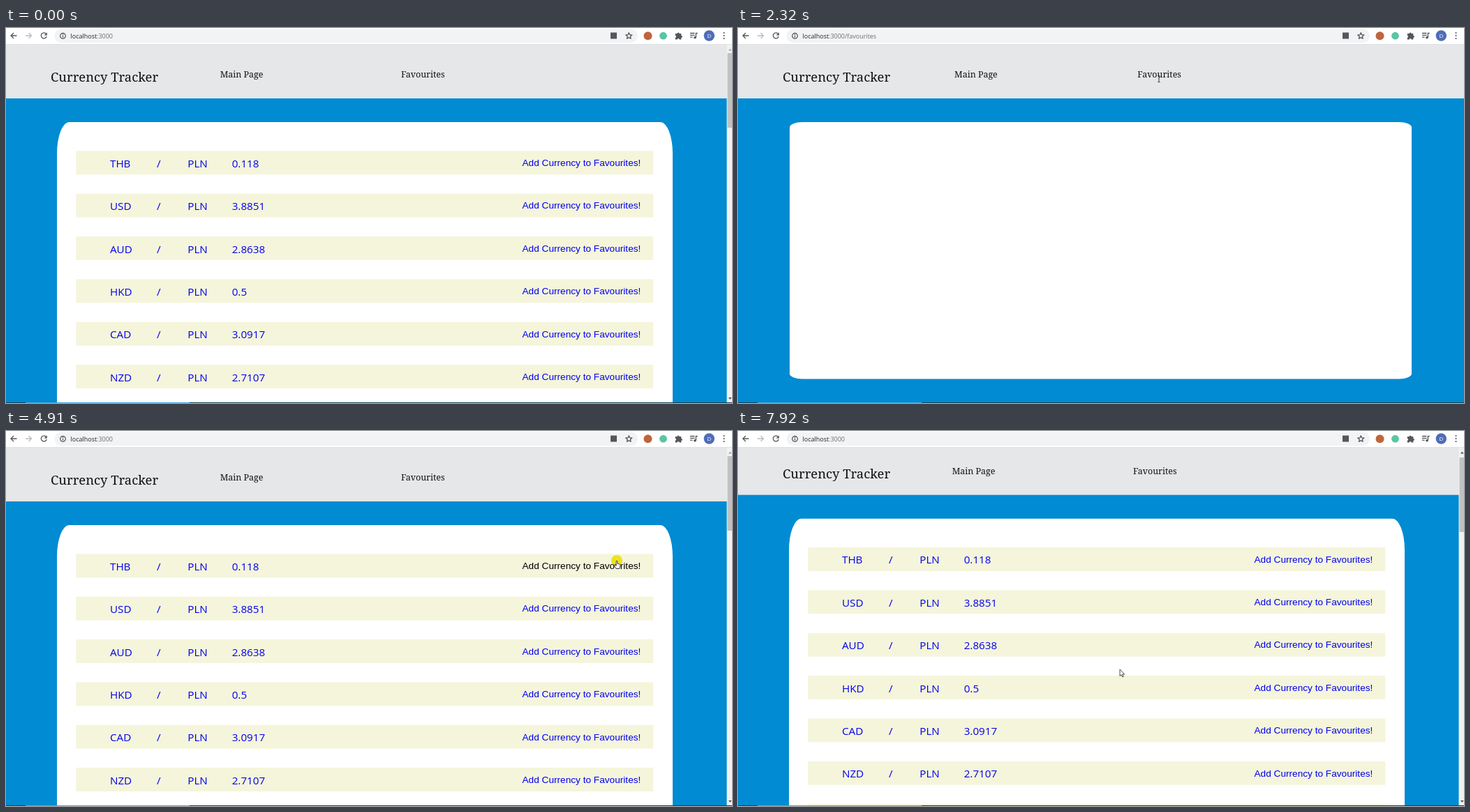
Recreate the animation shown at these times as an HTML page. Size 1040 by 538 pixels, loop 7990 ms.

```html
<!DOCTYPE html>
<html lang="en">
<head>
<meta charset="utf-8">
<title>Currency Tracker</title>
<style>
  html, body { margin: 0; width: 100%; height: 100%; overflow: hidden; background: #fff; }
  svg { display: block; }
  .serif { font-family: "Noto Serif", serif; fill: #111; }
  .title { font-size: 18.4px; }
  .nav { font-size: 12.45px; }
  .rate { font: 15.2px "Open Sans", sans-serif; fill: #0000f0; }
  .add { font: 13.65px "Liberation Sans", Arial, sans-serif; fill: #0000f0; }
  .add.active { fill: #000; }
  .url { font: 8.97px "Open Sans", sans-serif; fill: #222529; }
  .dim { fill: #6b7075; }
  .line { fill: none; stroke: #53575c; stroke-width: 1.3; }
  .solid { fill: #53575c; }
  .halo { fill: #f7ec28; mix-blend-mode: multiply; }
</style>
</head>
<body>
<svg width="1040" height="538" viewBox="0 0 1040 538">
  <rect width="1040" height="538" fill="#008bd2"/>

  <g id="page">
    <rect y="10" width="1040" height="91" fill="#e5e7e9"/>
    <text class="serif title" x="64" y="77">Currency Tracker</text>
    <text class="serif nav" id="navMain" y="71">Main Page</text>
    <text class="serif nav" id="navFav" y="71">Favourites</text>
    <g id="list">
      <rect x="73" y="135" width="882" height="2250" rx="17.6" ry="45" fill="#fff"/>
    </g>
    <rect id="empty" x="74" y="135" width="891" height="368.5" rx="17.8" ry="7.4" fill="#fff"/>
  </g>

  <g id="scrollbar">
    <rect x="1032.5" y="24" width="7.5" height="514" fill="#f1f1f1"/>
    <rect id="thumb" x="1033.5" y="36" width="6.5" height="107" fill="#c1c1c1"/>
    <path id="up" d="M1035 32.5l2.3-3 2.3 3z"/>
    <path d="M1035 530l2.3 3 2.3-3z" fill="#505050"/>
  </g>

  <g id="toolbar">
    <rect width="1040" height="23.5" fill="#fff"/>
    <rect y="23" width="1040" height="1" fill="#dfe1e4"/>
    <rect x="69.5" y="1.5" width="835.5" height="19.5" rx="9.75" fill="#f1f3f4"/>
    <path class="line" d="M15.5 11H7M11 7l-4 4 4 4"/>
    <path class="line" style="stroke:#babcbe" d="M28 11h8.5M32.5 7l4 4-4 4"/>
    <path class="line" d="M57.6 8.6A4 4 0 1 0 58.2 12"/>
    <path class="solid" d="M58.8 6.2v4.2h-4.2z"/>
    <circle class="line" cx="81.5" cy="11.3" r="3.8" stroke-width="1"/>
    <path class="line" d="M81.5 10.8v2.6M81.5 8.8v1.1"/>
    <text class="url" x="92.5" y="14.6">localhost<tspan class="dim">:3000<tspan id="path"></tspan></tspan></text>
    <rect class="solid" x="866" y="6.5" width="9" height="9"/>
    <path class="line" stroke-linejoin="round" d="M892.3 6.8l1.3 2.9 3.2.3-2.4 2.1.7 3.1-2.8-1.6-2.8 1.6.7-3.1-2.4-2.1 3.2-.3z"/>
    <circle cx="919.5" cy="11.2" r="6" fill="#c0643c"/>
    <circle cx="941.5" cy="11.2" r="5.4" fill="#58c6a2"/>
    <path class="solid" d="M958.8 8h2.7a1.6 1.6 0 0 1 3.2 0h2.6v2.7a1.6 1.6 0 0 1 0 3.2v2.6h-2.6a1.6 1.6 0 0 0-3.2 0h-2.7v-2.7a1.6 1.6 0 0 0 0-3.1z"/>
    <path class="line" d="M980 7.5h6.5M980 10.3h6.5M980 13.1h3.6M988.4 13.5V7.5h2.3"/>
    <circle class="solid" cx="987" cy="13.7" r="1.8"/>
    <circle cx="1007.3" cy="11" r="7.7" fill="#4f6cb8"/>
    <text x="1007.3" y="14" text-anchor="middle" font-family="Open Sans, sans-serif" font-size="8" fill="#fff">D</text>
    <g class="solid">
      <circle cx="1028.5" cy="7" r="1.1"/><circle cx="1028.5" cy="11" r="1.1"/><circle cx="1028.5" cy="15" r="1.1"/>
    </g>
  </g>

  <rect y="537" width="1040" height="1" fill="#12405a"/>
  <rect x="28" y="537" width="235" height="1" fill="#45a9de"/>

  <g id="cursor">
    <circle class="halo" id="halo" r="8"/>
    <path id="arrow" d="M0 0v9.6l2.2-2 1.5 3.3 1.5-.7-1.5-3.2h3z" fill="#fff" stroke="#222" stroke-width=".8"/>
    <path id="beam" d="M-1.6-4.5h1.2l.4.4.4-.4h1.2M0-4.2v8.4M-1.6 4.5h1.2l.4-.4.4.4h1.2" fill="none" stroke="#222" stroke-width=".9"/>
    <path id="hand" d="M-.9.8q.9-1.5 1.8 0v3.6l3 .6q1.2.4 1 1.7l-.7 3.2-.8 1.6h-4L-3.9 7q-.3-1.3 1-1l2 1.5z" fill="#fff" stroke="#222" stroke-width=".8"/>
  </g>
</svg>

<script>
const LOOP = 7990;
const ROW_TOP = 176.3, ROW_STEP = 61.35;
const rates = [["THB", "0.118"], ["USD", "3.8851"], ["AUD", "2.8638"], ["HKD", "0.5"],
               ["CAD", "3.0917"], ["NZD", "2.7107"], ["SGD", "2.8504"]];

// Pointer moves: start, end, steps, then start point, control point, end point
const moves = [
  [70, 620, 9, 1008, 556, 560, 300, 164, 82],
  [1300, 1790, 8, 164, 82, 400, 84, 603, 73],
  [2640, 3130, 8, 603, 72, 470, 38, 345, 66],
  [3750, 4240, 8, 345, 66, 350, 150, 388, 212],
  [4310, 4650, 5, 388, 212, 650, 205, 875, 186],
  [4980, 5600, 9, 875, 186, 850, 215, 826, 257],
  [6610, 7370, 11, 823.5, 263.5, 815, 295, 801, 322],
  [7500, 7920, 7, 801, 322, 690, 345, 547, 342]
];
const beamTimes = [[1790, 2250], [2320, 2640], [3130, 3480], [3550, 3750]];
const handTimes = [[4650, 4980], [5600, 6610]];
const clickTimes = [[2250, 2320], [3480, 3550], [4910, 4980]];

const $ = id => document.getElementById(id);
const within = (t, spans) => spans.some(([a, b]) => t >= a && t < b);
const show = (id, on) => { $(id).style.display = on ? "" : "none"; };

function add(tag, attrs, text = "") {
  const el = document.createElementNS("http://www.w3.org/2000/svg", tag);
  for (const key in attrs) el.setAttribute(key, attrs[key]);
  el.textContent = text;
  return $("list").appendChild(el);
}

const links = rates.map(([code, rate], i) => {
  const top = ROW_TOP + i * ROW_STEP;
  add("rect", { x: 100.3, y: top, width: 827, height: 34, fill: "#f5f5dc" });
  [[149, code], [216, "/"], [260.3, "PLN"], [323.7, rate]].forEach(([x, text]) =>
    add("text", { class: "rate", x, y: top + 23.5 }, text));
  return add("text", { class: "add", x: 739.5, y: top + 21.8 }, "Add Currency to Favourites!");
});

function pointerAt(t) {
  const move = moves.filter(m => t >= m[0]).pop();
  if (!move) return moves[0].slice(3, 5);
  const [start, end, steps, x0, y0, cx, cy, x1, y1] = move;
  const step = Math.floor((t - start) / (end - start) * (steps - 1) + 1e-6) + 1;
  const k = Math.min(1, step / steps);
  const p = k * k * (3 - 2 * k), q = 1 - p;
  const curve = (a, b, c) => q * q * a + 2 * q * p * b + p * p * c;
  return [curve(x0, cx, x1), curve(y0, cy, y1)];
}

function render(t) {
  const empty = t >= 2320 && t < 3680;
  const scroll = t >= 7920 ? 9.3 : 0;
  show("list", !empty);
  show("empty", empty);
  show("scrollbar", !empty);
  $("navMain").setAttribute("x", empty ? 310 : 306.7);
  $("navFav").setAttribute("x", empty ? 572.3 : 566);
  $("path").textContent = t >= 2320 && t < 3550 ? "/favourites" : "";
  $("page").setAttribute("transform", `translate(0 ${-scroll})`);
  $("thumb").setAttribute("y", scroll ? 38 : 36);
  $("up").setAttribute("fill", scroll ? "#505050" : "#a3a3a3");
  links[0].classList.toggle("active", t >= 4910 && t < 4980);

  const beam = within(t, beamTimes), hand = within(t, handTimes);
  show("beam", beam);
  show("hand", hand);
  show("arrow", !beam && !hand);
  show("halo", within(t, clickTimes));
  $("cursor").setAttribute("transform", `translate(${pointerAt(t)})`);
}

const origin = performance.now();
function tick() {
  render((performance.now() - origin) % LOOP);
  requestAnimationFrame(tick);
}
tick();
</script>
</body>
</html>
```
